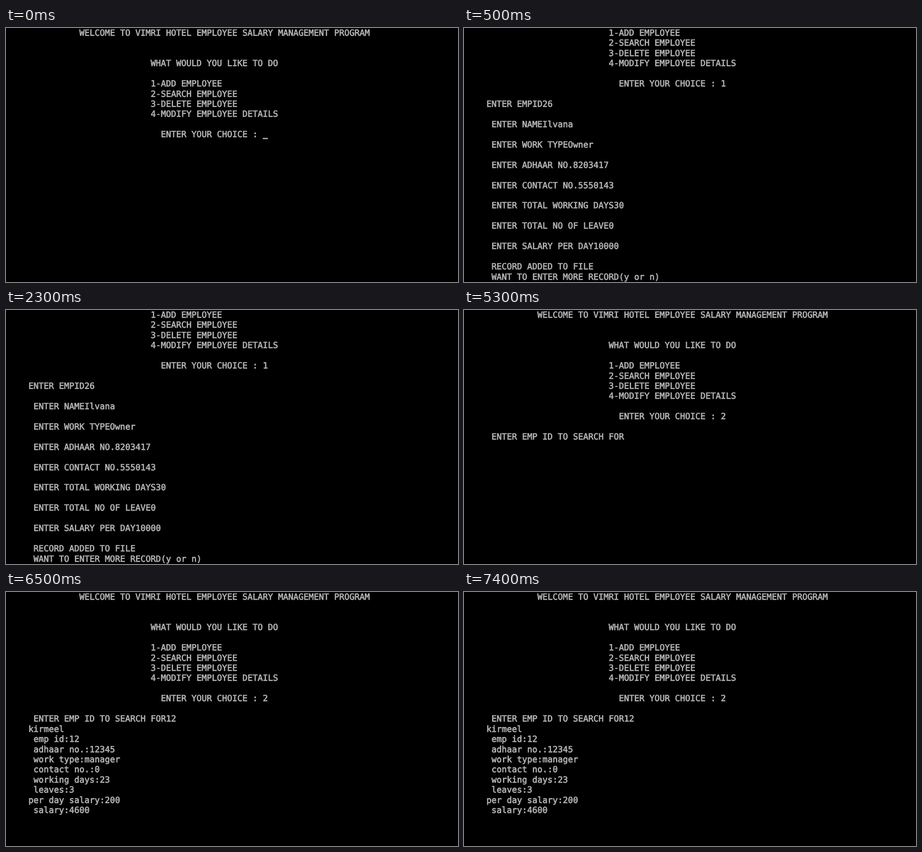
These frames come from a looping animation (998x561 px, 8 s). An HTML page:

```html
<!DOCTYPE html>
<html lang="en">
<head>
<meta charset="utf-8">
<title>Employee salary program</title>
<style>
  html, body { margin: 0; width: 100%; height: 100%; overflow: hidden; background: #000; }
  svg { display: block; width: 998px; height: 561px; }
  text {
    font: 18.69px "DejaVu Sans Mono", monospace;
    fill: #b0b0b0;
    stroke: #b0b0b0;
    stroke-width: .85px;
    white-space: pre;
    text-rendering: geometricPrecision;
    font-variant-ligatures: none;
  }
  rect { fill: #b0b0b0; }
</style>
</head>
<body>
<svg id="stage" viewBox="0 0 998 561"></svg>
<script>
const LOOP = 8000;
const LEFT = 49.4, COL = 11.25, ROW = 22.45;
const BASELINE = 16.8, UNDERLINE = 18.2;
const stage = document.getElementById('stage');

// Each line is [row, column, text].
const menu = (top, choice) => [
  [top, 24, '1-ADD EMPLOYEE'],
  [top + 1, 24, '2-SEARCH EMPLOYEE'],
  [top + 2, 24, '3-DELETE EMPLOYEE'],
  [top + 3, 24, '4-MODIFY EMPLOYEE DETAILS'],
  [top + 5, 26, 'ENTER YOUR CHOICE : ' + choice]
];

const home = choice => [
  [0, 10, 'WELCOME TO VIMRI HOTEL EMPLOYEE SALARY MANAGEMENT PROGRAM'],
  [3, 24, 'WHAT WOULD YOU LIKE TO DO'],
  ...menu(5, choice)
];

const search = id => [...home('2'), [12, 1, 'ENTER EMP ID TO SEARCH FOR' + id]];

const screens = [
  { start: 0, lines: home(''), cursor: [10, 46] },
  { start: 500, lines: [
    ...menu(0, '1'),
    [7, 0, 'ENTER EMPID26'],
    [9, 1, 'ENTER NAMEIlvana'],
    [11, 1, 'ENTER WORK TYPEOwner'],
    [13, 1, 'ENTER ADHAAR NO.8203417'],
    [15, 1, 'ENTER CONTACT NO.5550143'],
    [17, 1, 'ENTER TOTAL WORKING DAYS30'],
    [19, 1, 'ENTER TOTAL NO OF LEAVE0'],
    [21, 1, 'ENTER SALARY PER DAY10000'],
    [23, 1, 'RECORD ADDED TO FILE'],
    [24, 1, 'WANT TO ENTER MORE RECORD(y or n)']
  ] },
  { start: 3500, lines: search('') },
  { start: 6500, lines: [
    ...search('12'),
    [13, 0, 'kirmeel'],
    [14, 1, 'emp id:12'],
    [15, 1, 'adhaar no.:12345'],
    [16, 1, 'work type:manager'],
    [17, 1, 'contact no.:0'],
    [18, 1, 'working days:23'],
    [19, 1, 'leaves:3'],
    [20, 0, 'per day salary:200'],
    [21, 1, 'salary:4600']
  ] }
];

function add(parent, tag, attrs = {}, text = '') {
  const el = document.createElementNS('http://www.w3.org/2000/svg', tag);
  for (const key in attrs) el.setAttribute(key, attrs[key]);
  el.textContent = text;
  return parent.appendChild(el);
}

for (const screen of screens) {
  screen.group = add(stage, 'g');
  for (const [row, col, text] of screen.lines) {
    add(screen.group, 'text', { x: LEFT + col * COL, y: row * ROW + BASELINE }, text);
  }
  if (screen.cursor) {
    const [row, col] = screen.cursor;
    add(screen.group, 'rect', { x: LEFT + col * COL, y: row * ROW + UNDERLINE, width: COL, height: 2.8 });
  }
}

const origin = performance.now();

function draw(now) {
  const time = Math.max(0, now - origin) % LOOP;
  const current = screens.findLast(screen => screen.start <= time);
  for (const screen of screens) {
    screen.group.style.display = screen === current ? '' : 'none';
  }
  requestAnimationFrame(draw);
}
draw(origin);
</script>
</body>
</html>
```
